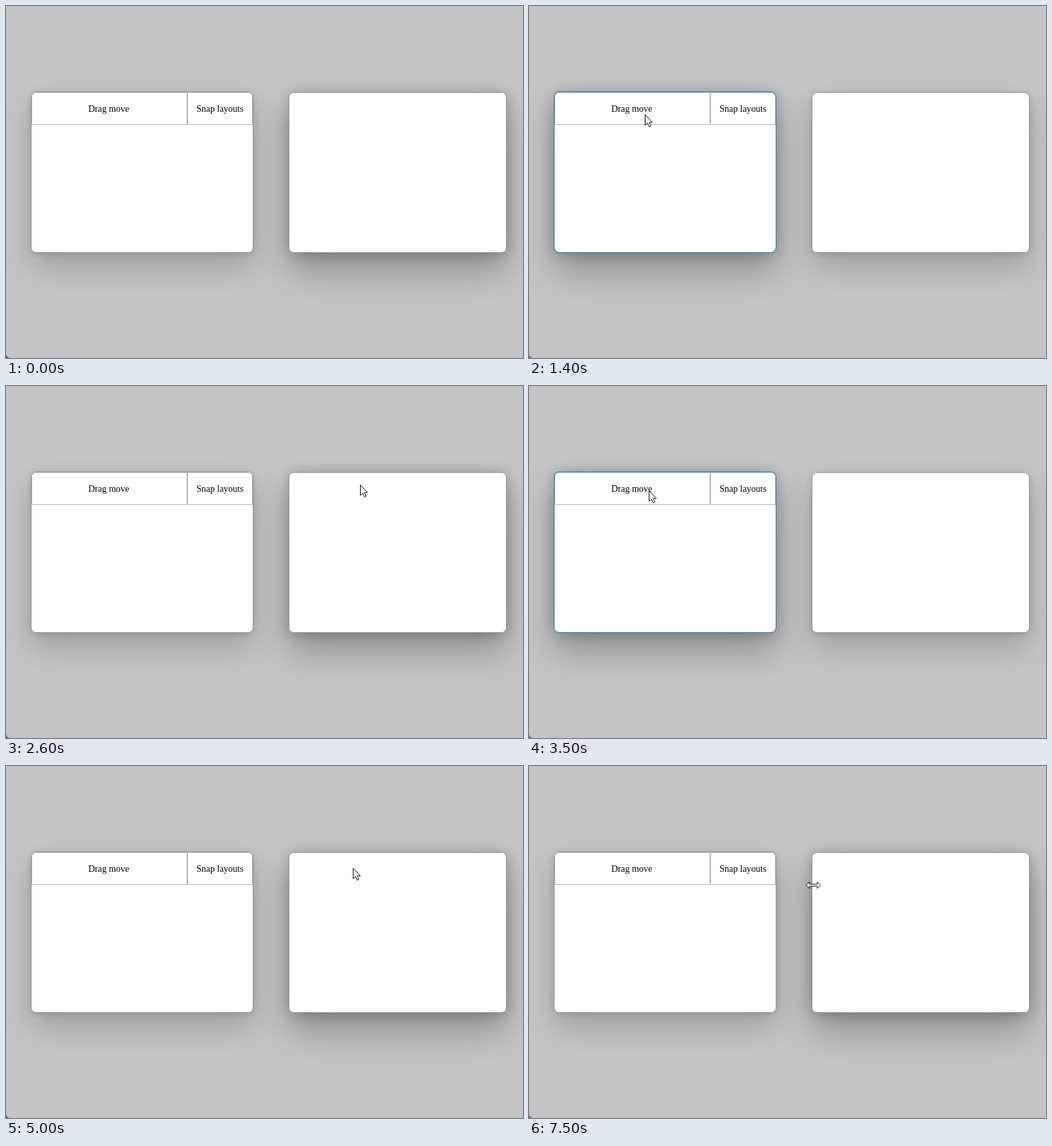
Recreate the animation shown at these times as an HTML page. Size 790 by 539 pixels, loop 8000 ms.

```html
<!DOCTYPE html>
<html lang="en">
<head>
<meta charset="utf-8">
<title>Window focus</title>
<style>
html, body { margin: 0; width: 100%; height: 100%; overflow: hidden; background: #c4c4c4; }
.stage { position: relative; width: 790px; height: 539px; overflow: hidden; background: #c4c4c4; }
.stage * { box-sizing: border-box; }
.left { left: 38px; top: 131px; width: 340px; height: 247px; }
.right { left: 432px; top: 132px; width: 333px; height: 246px; }
.shade, .win, .ring { position: absolute; border-radius: 8px; }
.on { box-shadow: 0 28px 54px rgba(0,0,0,.27), 0 2px 21px rgba(0,0,0,.23); }
.off { box-shadow: 0 22px 48px rgba(0,0,0,.19), 0 2px 12px rgba(0,0,0,.14); }
.win { background: #fff; border: 1px solid #929292; overflow: hidden; }
.ring { border: 1px solid #147bbd; }
.bar { display: flex; height: 50px; font: 14px/49px "Liberation Serif", "Times New Roman", serif; color: #000; text-align: center; }
.bar div { width: 238px; padding-right: 2px; border: 1px solid #b2b2b2; border-top-left-radius: 7px; }
.bar div + div { width: 100px; padding: 0; border-radius: 0 7px 0 0; }
svg { position: absolute; left: 0; top: 0; }
.edge { fill: #707070; animation: edge 8s step-end infinite; }
.pointer { animation: move 8s step-end infinite; }
.pointer path { fill: #fff; stroke: #000; stroke-linejoin: round; }
.lit { animation: lit 8s step-end infinite; }
.dim { animation: dim 8s step-end infinite; }
.arrow { animation: arrow 8s step-end infinite; }
.resize { animation: resize 8s step-end infinite; }

/* focus alternates between the two windows */
@keyframes lit {
  0%, 32.5%, 58.75%, 100% { opacity: 0; }
  15%, 43.75% { opacity: 1; }
}
@keyframes dim {
  0%, 32.5%, 58.75%, 100% { opacity: 1; }
  15%, 43.75% { opacity: 0; }
}
@keyframes edge {
  0% { fill: #0a78d0; }
  15%, 100% { fill: #707070; }
}
@keyframes arrow {
  0%, 77.5%, 92.5%, 100% { opacity: 0; }
  1.25%, 88.75% { opacity: 1; }
}
@keyframes resize {
  0%, 88.75% { opacity: 0; }
  77.5%, 92.5%, 100% { opacity: 1; }
}
@keyframes move {
  0%, 1.25% { transform: translate(727px, 35px); }
  1.25% { animation-timing-function: steps(3); }
  5% { transform: translate(405px, 90px); animation-timing-function: steps(3); }
  8.75% { transform: translate(239px, 134px); }
  10% { transform: translate(206px, 147px); }
  11.25% { transform: translate(181px, 163px); }
  12.5% { transform: translate(177px, 166px); }

  22.5% { transform: translate(222px, 165px); }
  23.75% { transform: translate(330px, 174px); animation-timing-function: steps(2); }
  26.25% { transform: translate(498px, 156px); }
  27.5% { transform: translate(530px, 151px); }
  28.75% { transform: translate(541px, 151px); }

  36.25% { transform: translate(530px, 152px); }
  37.5% { transform: translate(365px, 168px); }
  38.75% { transform: translate(262px, 164px); }
  40% { transform: translate(200px, 161px); }
  41.25% { transform: translate(183px, 160px); }

  47.5% { transform: translate(194px, 161px); }
  48.75% { transform: translate(320px, 164px); }
  50% { transform: translate(434px, 164px); }
  51.25% { transform: translate(495px, 157px); }
  52.5% { transform: translate(530px, 154px); }
  53.75% { transform: translate(545px, 153px); }
  55% { transform: translate(549px, 153px); }

  61.25% { transform: translate(546px, 154px); }
  62.5% { transform: translate(530px, 156px); }
  63.75% { transform: translate(522px, 157px); }
  65% { transform: translate(481px, 161px); }
  66.25% { transform: translate(434px, 198px); }
  67.5% { transform: translate(412px, 204px); }
  68.75% { transform: translate(405px, 203px); }
  70% { transform: translate(402px, 206px); }

  72.5% { transform: translate(405px, 204px); animation-timing-function: steps(3); }
  76.25% { transform: translate(430px, 180px); animation-timing-function: steps(4); }
  81.25% { transform: translate(431px, 135px); }
  83.75% { transform: translate(431px, 139px); animation-timing-function: steps(5); }
  90% { transform: translate(430px, 180px); }
  92.5% { transform: translate(433px, 182px); }
  93.75%, 100% { transform: translate(434px, 182px); }
}
</style>
</head>
<body>
<div class="stage">
  <div class="shade left off dim"></div>
  <div class="shade left on lit"></div>
  <div class="shade right off lit"></div>
  <div class="shade right on dim"></div>
  <div class="win left">
    <div class="bar"><div>Drag move</div><div>Snap layouts</div></div>
  </div>
  <div class="ring left lit"></div>
  <div class="win right"></div>
  <svg width="790" height="539">
    <path class="edge" d="M0 533Q1 538 6 539H0Z"/>
    <g class="pointer">
      <path class="arrow" d="M.5 .5V16.5L4.2 13.2 6.6 18.8 9.1 17.7 6.8 12.2H11.5Z"/>
      <path class="resize" transform="translate(.5 .5)" d="M-11 0L-6-5V-1.5H6V-5L11 0 6 5V1.5H-6V5Z"/>
    </g>
  </svg>
</div>
</body>
</html>
```
